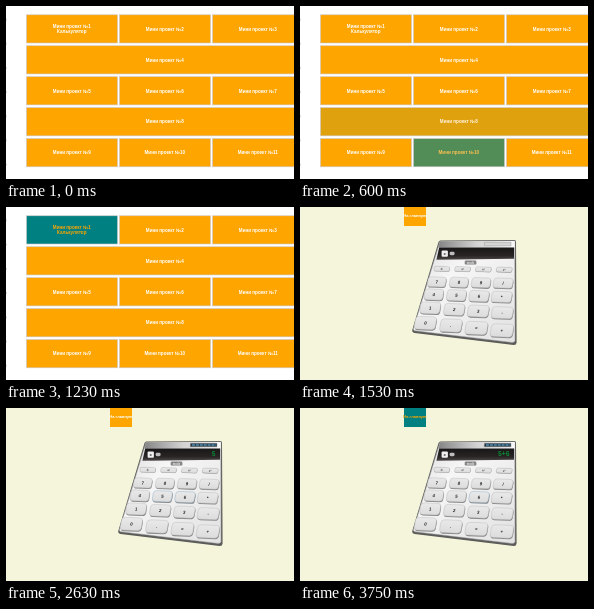
An HTML page for the animation above (3920 ms loop, 288 px wide and 173 px high).

```html
<!DOCTYPE html>
<html lang="ru">
<head>
<meta charset="utf-8">
<title>Мини проекты</title>
<style>
html, body { margin: 0; width: 100%; height: 100%; overflow: hidden; background: #fff; }
svg { display: block; width: 100vw; height: 100vh; }
text { font-family: "Liberation Sans", Arial, sans-serif; font-weight: bold; text-anchor: middle; }
</style>
</head>
<body>
<svg id="stage" viewBox="0 0 288 173">
  <defs>
    <linearGradient id="body" x1="0" y1="0" x2="1" y2="1">
      <stop offset="0" stop-color="#d8d8d8"/><stop offset=".35" stop-color="#f6f6f6"/><stop offset="1" stop-color="#e2e2e2"/>
    </linearGradient>
    <linearGradient id="head" x1="0" y1="0" x2="1" y2="0">
      <stop offset="0" stop-color="#858585"/><stop offset=".5" stop-color="#d2d2d2"/><stop offset="1" stop-color="#fafafa"/>
    </linearGradient>
    <linearGradient id="screen" x1="0" y1="0" x2="0" y2="1">
      <stop offset="0" stop-color="#181616"/><stop offset=".65" stop-color="#282424"/><stop offset="1" stop-color="#4c4646"/>
    </linearGradient>
    <linearGradient id="cap" x1="0" y1="0" x2="0" y2="1">
      <stop offset="0" stop-color="#e9e9e9"/><stop offset="1" stop-color="#dcdcdc"/>
    </linearGradient>
  </defs>
  <g id="menu"><rect width="288" height="173" fill="#fff"/></g>
  <g id="calc"><rect width="288" height="173" fill="#f5f5dc"/></g>
</svg>
<script>
const LOOP = 3920;
const ORANGE = [255, 165, 0], TEAL = [0, 128, 128], WHITE = [255, 255, 255];
const STEPS = [0, 300, 450, 600, 760, 920, 1070, 1230, 1530, 1700, 2020, 2160, 2330,
  2490, 2630, 2800, 2960, 3120, 3260, 3440, 3580, 3750];
const menu = document.getElementById('menu');
const calc = document.getElementById('calc');

function add(parent, tag, attrs, text) {
  const el = document.createElementNS('http://www.w3.org/2000/svg', tag);
  for (const k in attrs) el.setAttribute(k, attrs[k]);
  if (text) el.textContent = text;
  parent.appendChild(el);
  return el;
}

const mix = (a, b, p) => `rgb(${a.map((v, i) => Math.round(v + (b[i] - v) * p))})`;

// Latest value of a [time, value] list
function at(list, t, start) {
  let value = start;
  for (const [time, v] of list || []) if (t >= time) value = v;
  return value;
}

// Menu page
for (let i = 0; i < 7; i++) add(menu, 'rect', { x: 0, y: 12.5 + i * 24.2, width: .7, height: 2, fill: '#ccc' });

const tiles = [];
function addTile(x, y, w) {
  const n = tiles.length + 1, cx = x + w / 2 - .2;
  const box = add(menu, 'rect', { x, y, width: w, height: 28.2, stroke: '#c9c5c8', 'stroke-width': .6 });
  const lines = n === 1 ? ['Мини проект №1', 'Калькулятор'] : ['Мини проект №' + n];
  const labels = lines.map((s, i) =>
    add(menu, 'text', { x: cx, y: y + 15.8 + (i - (lines.length - 1) / 2) * 5.4, 'font-size': 4.6 }, s));
  tiles.push({ box, labels });
}
for (let row = 0; row < 5; row++) {
  const y = 8.8 + row * 30.95;
  if (row % 2) addTile(20.5, y, 277);
  else for (let col = 0; col < 3; col++) addTile(20.5 + col * 93, y, 91);
}

const glow = {
  1: [[920, .14], [1070, 1]],
  4: [[920, .38], [1070, 0]],
  6: [[760, .5], [920, 0]],
  8: [[300, .38], [450, 0], [600, .12], [760, 0]],
  10: [[300, .14], [450, 1], [600, .68], [760, 0]]
};

// Calculator page
const link = add(calc, 'rect', { x: 104, y: 0, width: 22, height: 19 });
const linkText = add(calc, 'text', { x: 114.9, y: 10.3, 'font-size': 4 }, 'На главную');

add(calc, 'path', { d: 'M140.5 33.4 L214.5 33 Q216 33 216 35 L216.6 135.5 Q216.4 138.2 213.5 138 L114.5 126 Q111.5 125.4 112.4 122.5 L138.5 35 Q139 33.4 140.5 33.4 Z', fill: '#5c5c5a' });
add(calc, 'path', { d: 'M140 34.2 L214.8 33.9 L215 133.8 Q214.6 135.6 212 135.4 L115 123.8 Q112.8 123.3 113.6 121 Z', fill: 'url(#body)', stroke: '#9a9a9a', 'stroke-width': .5 });
add(calc, 'path', { d: 'M140 34.2 L214.8 33.9 L214.8 40.4 L138.4 40.4 Z', fill: 'url(#head)' });
add(calc, 'path', { d: 'M139.2 40.4 L214 40.4 L214 51.8 L136.4 52.8 Z', fill: 'url(#screen)' });
const solar = add(calc, 'path', { d: 'M184.5 35.3 H211 V38.8 H184.2 Z', stroke: '#888', 'stroke-width': .4 });
const cells = add(calc, 'path', { d: 'M186 37 H210.3', stroke: '#4d91b5', 'stroke-width': 1.4, 'stroke-dasharray': '3 .9', fill: 'none' });

add(calc, 'rect', { x: 141.6, y: 43.4, width: 6.3, height: 6.3, rx: 1, fill: '#efefef' });
add(calc, 'text', { x: 144.7, y: 48, 'font-size': 4.2, fill: '#333' }, 'x');
add(calc, 'rect', { x: 149.6, y: 44.8, width: 5, height: 3.4, rx: 1.4, fill: '#bdbdbd' });
add(calc, 'rect', { x: 164.8, y: 53.6, width: 11.5, height: 4, rx: 1.2, fill: '#808080', stroke: '#bbb', 'stroke-width': .4 });
add(calc, 'text', { x: 170.5, y: 56.5, 'font-size': 2.8, fill: '#eee' }, 'mode');
const result = add(calc, 'text', { x: 209.5, y: 47.6, 'font-size': 6.4, fill: '#0b8a34', style: 'text-anchor:end;font-family:"Liberation Mono",monospace' });

function addKey(x, y, w, h, label, size, depth) {
  const g = add(calc, 'g', { transform: `matrix(1 .04 -.17 1 ${x} ${y})` });
  const box = { x: -w / 2, y: -h / 2, width: w, height: h, rx: h * .28 };
  add(g, 'rect', { ...box, x: box.x + depth * .6, y: box.y + depth, fill: '#858585' });
  const cap = add(g, 'rect', { ...box, fill: 'url(#cap)', stroke: '#b4b4b4', 'stroke-width': .4 });
  add(g, 'text', { x: 0, y: size * .36, 'font-size': size, fill: '#222' }, label);
  return cap;
}

['C', 'x²', 'x²', 'x³'].forEach((s, i) => addKey(141.8 + i * 20.8, 61.8 + i * .3, 15.5, 4.8, s, 2.8, .3));

const keys = {};
// First centre x, y, column step, slope, width, height, labels
[
  [136.8, 74.9, 22.1, .4, 18, 9.8, '789/'],
  [133.8, 87.5, 22.6, .8, 18.8, 10.8, '456*'],
  [130.2, 100.9, 24, 1.6, 20, 11.6, '123-'],
  [125.4, 116, 25.5, 2.5, 21, 12.8, '0.=+']
].forEach(([x, y, dx, dy, w, h, labels]) => {
  [...labels].forEach((s, i) => { keys[s] = addKey(x + i * dx, y + i * dy, w + i * .4, h, s, 4.4, 1); });
});

const hovers = [['8', 2020, 2160], ['5', 2160, 2800], ['6', 2630, 2800], ['+', 2800, 3120], ['6', 3120, LOOP]];
const presses = [['5', 2330, 2490], ['+', 2960, 3120], ['6', 3260, 3440]];
const active = (list, key, t) => list.some(([k, from, to]) => k === key && t >= from && t < to);

function drawMenu(t) {
  tiles.forEach(({ box, labels }, i) => {
    const p = at(glow[i + 1], t, 0);
    box.setAttribute('fill', mix(ORANGE, TEAL, p));
    const ink = mix(WHITE, ORANGE, i === 0 && t < 1230 ? p * .85 : p);
    labels.forEach(el => el.setAttribute('fill', ink));
  });
}

function drawCalc(t) {
  const p = at([[3580, .6], [3750, 1]], t, 0);
  link.setAttribute('fill', mix(ORANGE, TEAL, p));
  linkText.setAttribute('fill', mix(WHITE, ORANGE, p));
  solar.setAttribute('fill', t < 1700 ? '#d4d4d2' : '#26333c');
  cells.setAttribute('visibility', t < 1700 ? 'hidden' : 'inherit');
  result.textContent = at([[2490, '5'], [2960, '5+'], [3260, '5+6']], t, '');
  for (const k in keys) {
    keys[k].setAttribute('fill', active(presses, k, t) ? '#c6cdd4' : 'url(#cap)');
    keys[k].setAttribute('stroke', active(hovers, k, t) ? '#88a8c4' : '#b4b4b4');
  }
}

function draw(now) {
  const time = now % LOOP;
  const t = STEPS.filter(s => s <= time).pop();
  const first = t < 1530;
  menu.setAttribute('visibility', first ? 'visible' : 'hidden');
  calc.setAttribute('visibility', first ? 'hidden' : 'visible');
  if (first) drawMenu(t); else drawCalc(t);
}

const begin = performance.now();
function tick() {
  draw(performance.now() - begin);
  requestAnimationFrame(tick);
}
tick();
</script>
</body>
</html>
```
